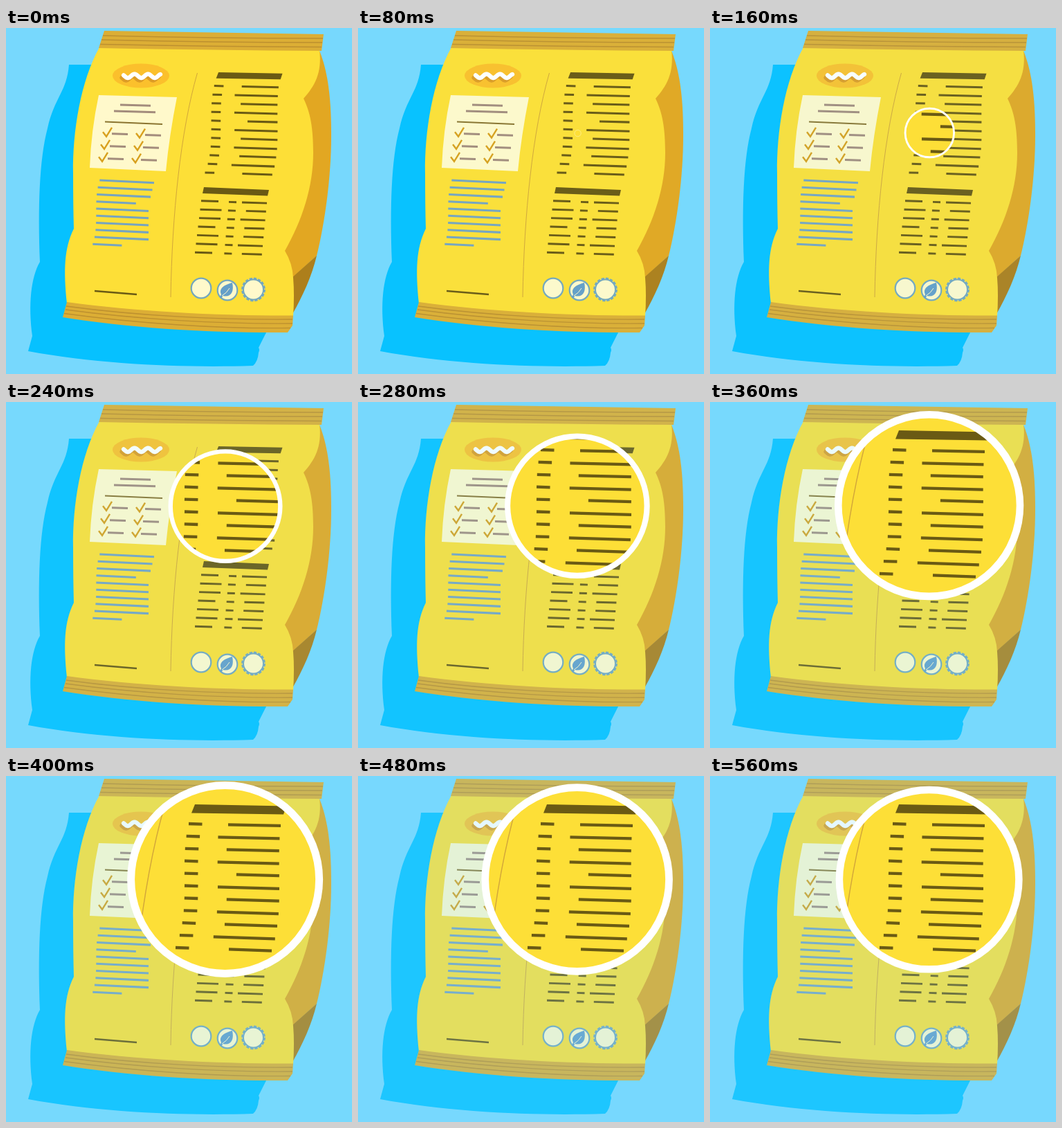
An HTML page for the animation above (600 ms loop, 500x500 px).

```html
<!DOCTYPE html>
<html lang="en">
<head>
<meta charset="utf-8">
<title>Label magnifier</title>
<style>
  html, body { margin: 0; width: 100%; height: 100%; overflow: hidden; background: #77d8fd; }
  svg { display: block; width: 100vw; height: 100vh; }
  .line { fill: none; }
</style>
</head>
<body>
<svg viewBox="0 0 500 500">
  <defs>
    <clipPath id="hole"><circle class="disc"/></clipPath>
    <!-- drawn at the enlarged size, scaled down on the bag -->
    <g id="facts">
      <path fill="#6a5a14" d="M273 41L405 43.5L401 55.5L268 53.5Z"/>
      <path id="factRows" class="line" stroke="#6a5a14" stroke-width="4.3"/>
    </g>
    <path id="fold" class="line" stroke="#d2a63a" d="M276.5 65C252 150 240 270 238 389"/>
  </defs>

  <path fill="#06c1ff" d="M91 53H160L380 432Q373 446 365 462Q367 465 365 469Q364 482 357 488C260 491 140 487 32 467L38 445C32 400 36 360 49 338C46 260 48 190 60 145C70 100 88 92 91 53Z"/>

  <path fill="#e2a722" d="M453 33C466 65 470 105 470 155C470 215 461 280 449 329L414 361L395 330L420 100Z"/>
  <path fill="#ad7f1c" d="M449 329L413 361V415C430 385 442 358 449 329Z"/>
  <path fill="#fddf37" d="M135 28C108 76 96 150 97 210Q97 255 98 290C84 318 83 350 88 398Q250 422 415 417Q417 385 415 361Q414 340 403 322C428 278 444 230 444 180C444 145 440 122 430 102C446 84 457 65 453 32Z"/>

  <path fill="#dcae35" d="M142 4L459 9L456 33Q300 32 134 29Z"/>
  <path class="line" stroke="#bd902f" stroke-width="1.3" d="M140 11Q300 15 458 15M138 17Q300 21 457 21M136 23.5Q300 27 456 27.5"/>
  <path fill="#dcae35" d="M88 396C190 410 310 416 415 415.5L414 430L407 440C300 441 180 434 82 418Z"/>
  <path class="line" stroke="#bd902f" stroke-width="1.3" d="M87 402C190 416 310 422 414 421M86 407C190 421 310 428 414 427M84 412.5C190 427 310 435 411 433.5"/>

  <ellipse cx="195" cy="69" rx="41" ry="17.5" fill="#fbc02c"/>
  <g class="line" stroke-linecap="round" stroke-linejoin="round" stroke-width="6.2">
    <path class="wave" stroke="#dc9c25" transform="translate(-2.5 3.5)"/>
    <path class="wave" stroke="#fff"/>
  </g>

  <path fill="#fff9cb" d="M134 97L247 100Q236 155 231 207L121 202Q123 148 134 97Z"/>
  <path id="panelRows" class="line" stroke="#a38c7c" stroke-width="3"/>
  <path class="line" stroke="#8a7430" stroke-width="2" d="M143 135.5L226 139"/>
  <path id="checks" class="line" stroke="#d8a01e" stroke-width="2.4"/>

  <path id="blueRows" class="line" stroke="#76a4c0" stroke-width="3.1"/>
  <path class="line" stroke="#6a5a14" stroke-width="2.4" d="M128 380L189 385"/>

  <use href="#fold"/>
  <use href="#facts" transform="translate(116 35.3) scale(.7)"/>
  <path fill="#6a5a14" d="M286 230L380 234L378 242.5L284 239Z"/>
  <path id="smallRows" class="line" stroke="#6a5a14" stroke-width="2.9"/>

  <g fill="#fff9cb" stroke="#74a7bd" stroke-width="2.2">
    <circle cx="282" cy="376" r="14.3"/>
    <circle cx="320" cy="379" r="14.3"/>
    <circle cx="357.5" cy="378" r="16" stroke-width="2.8" stroke-dasharray="4.2 2.08"/>
    <circle cx="357.5" cy="378" r="14.6"/>
  </g>
  <path fill="#659fc8" d="M327 368C330 381 325 390 313.5 387L311 391L309 389.5L311 385C307 376 316 371 327 368Z"/>
  <path class="line" stroke="#fff9cb" stroke-width="1" d="M312 387Q319 383 323 376"/>

  <rect id="veil" width="500" height="500" fill="#77d8fd" opacity="0"/>

  <g id="lens" visibility="hidden">
    <g clip-path="url(#hole)">
      <rect width="500" height="500" fill="#fddf37"/>
      <use href="#fold" transform="scale(1.4286) translate(-116 -35.3)"/>
      <use href="#facts"/>
    </g>
    <circle id="ring" class="disc line" stroke="#fff"/>
  </g>
</svg>
<script>
const $ = id => document.getElementById(id);
const all = selector => document.querySelectorAll(selector);
const range = n => [...Array(n).keys()];

const row = (x1, x2, y, slope = 0.03) => `M${x1} ${y}L${x2} ${y + (x2 - x1) * slope}`;
const put = (id, count, rule) => $(id).setAttribute('d', range(count).map(rule).join(''));

// column edges bend with the bag, u counts rows from the middle
const bend = (u, cubic, square) => -cubic * u ** 3 - square * u ** 2;

put('factRows', 11, i => {
  const u = i - 5;
  const left = 258 + bend(u, 0.076, 0.14);
  const right = 395 + bend(u, 0.052, 0.18);
  const size = i % 2 ? 89 : i % 6 === 4 ? 62 : 76;
  return row(left, left + 19.5, 69 + i * 17.9) +
    row(right - size, right, 70.3 + i * 18, 0.022 + i * 0.0015);
});

put('smallRows', 7, i => {
  const y = 249.8 + i * 12.4;
  const left = 282 - i * 1.5, mid = 322 - i * 1.1, right = 377 - i * 1.2;
  return row(left, left + (i % 3 ? 31 : 25), y) +
    row(mid, mid + 11, y + 1.6) +
    row(right - (i * 3 % 5 < 2 ? 36 : 29), right, y + 2.2);
});

// every sixth line ends a paragraph
put('blueRows', 10, i => row(
  130.3 + bend(i - 4.5, 0.055, 0),
  i % 6 === 3 ? 198 - i * 3.4 : Math.max(206, 214 - i * 2.5),
  220 + i * 10.25, 0.047));

const cells = range(6).map(i => {
  const line = i >> 1, side = i % 2;
  return [140 - 3 * line + 48 * side, 150.3 + 18 * line + 1.8 * side];
});
put('checks', 6, i => `M${cells[i]}l5 6.5l8 -13`);
put('panelRows', 6, i => row(cells[i][0] + 13, cells[i][0] + 36, cells[i][1] + 2.4));
$('panelRows').setAttribute('d',
  $('panelRows').getAttribute('d') + row(165, 209, 111) + row(156, 216, 120));

const wave = range(54).map(i => [170 + i, 69.3 + 2.8 * Math.cos((i - 6) / 3.1)]);
all('.wave').forEach(path => path.setAttribute('d', 'M' + wave.join('L')));

const LOOP = 600, STEP = 40;
const ramp = (t, a, b) => Math.min(1, Math.max(0, (t - a) / (b - a)));
const ease = p => p * p * (3 - 2 * p);
const discs = all('.disc');

function draw(now) {
  const t = Math.floor(now % LOOP / STEP) * STEP;
  const s = ease(ramp(t, 40, 400)) - 0.046 * ease(ramp(t, 400, 560));
  const width = 11 * s;
  for (const disc of discs) {
    disc.setAttribute('cx', 317.6 - s);
    disc.setAttribute('cy', 152.2 - 2.7 * s);
    disc.setAttribute('r', 141.5 * s - width / 2);
  }
  $('ring').setAttribute('stroke-width', width);
  $('lens').setAttribute('visibility', s > 0 ? 'visible' : 'hidden');
  $('veil').setAttribute('opacity', 0.2 * ramp(t, 40, 480));
}

let start;
function tick(now) {
  start ??= now;
  draw(now - start);
  requestAnimationFrame(tick);
}
draw(0);
requestAnimationFrame(tick);
</script>
</body>
</html>
```
